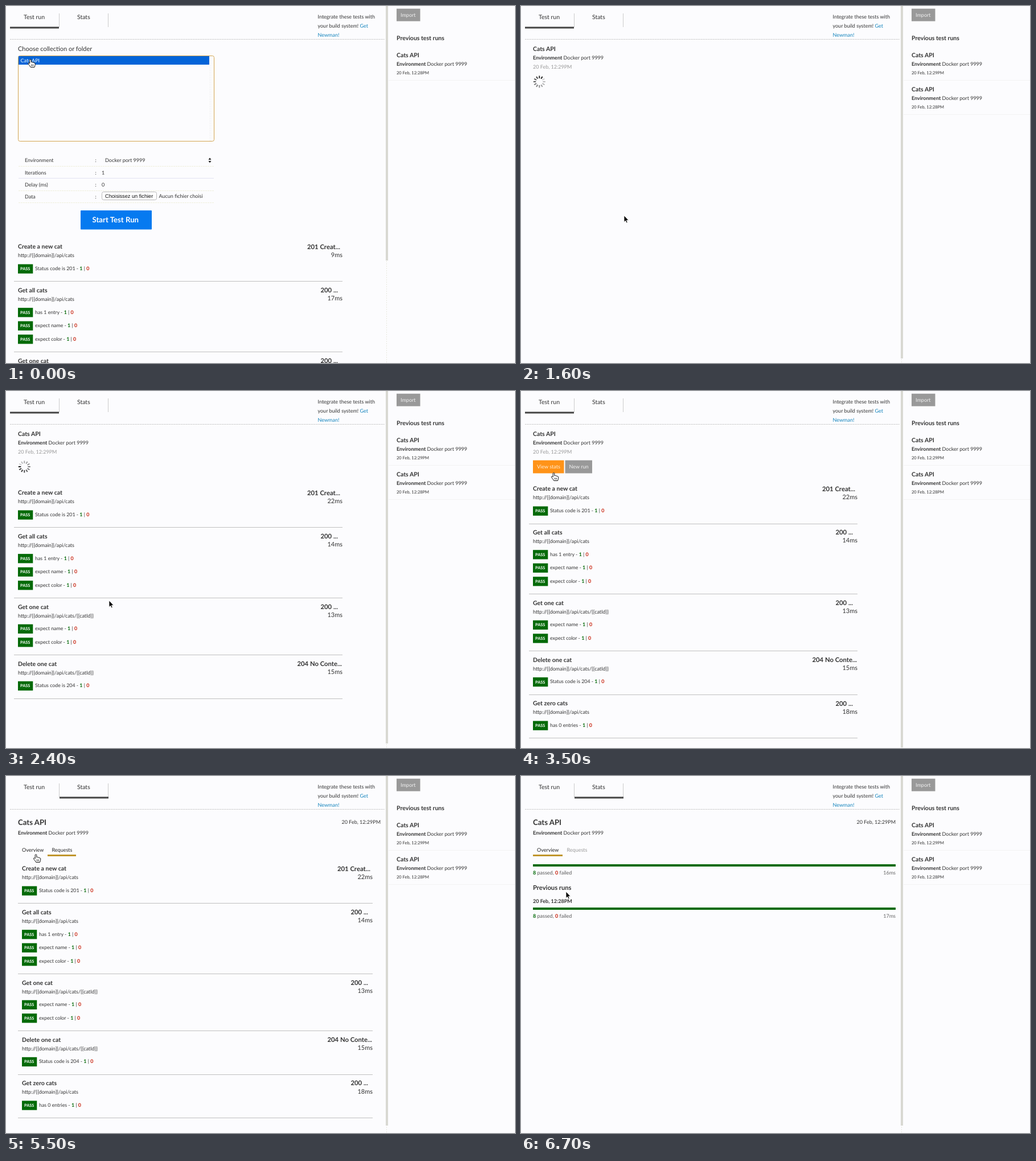
Recreate the animation shown at these times as an HTML page. Size 894 by 627 pixels, loop 6800 ms.

```html
<!DOCTYPE html>
<html lang="en">
<head>
<meta charset="utf-8">
<title>Test runner</title>
<style>
  html, body { margin: 0; width: 100%; height: 100%; overflow: hidden; background: #fcfcfe; }
  svg { display: block; font-family: Lato, sans-serif; text-rendering: geometricPrecision; }
</style>
</head>
<body>
<svg id="stage" width="894" height="627" viewBox="0 0 894 627"></svg>
<script>
const LOOP = 6800, STEP = 100;
const INK = '#333', GREEN = '#046a08', RED = '#c8210c', GREY = '#999', GOLD = '#c0962c';

// y is the middle of the capital letters
const text = (x, y, s, size = 9, { fill = INK, bold, end, font } = {}) =>
  `<text x="${x}" y="${Math.round(y + size * .36)}" font-size="${size}" fill="${fill}"` +
  `${bold ? ' font-weight="700"' : ''}${end ? ' text-anchor="end"' : ''}` +
  `${font ? ` font-family="${font}"` : ''}>${s}</text>`;
const rect = (x, y, w, h, fill, more = '') =>
  `<rect x="${x}" y="${y}" width="${w}" height="${h}" fill="${fill}" ${more}/>`;
const line = (x1, y1, x2, y2, stroke, dash = '') =>
  `<path d="M${x1} ${y1}L${x2} ${y2}" stroke="${stroke}" stroke-dasharray="${dash}"/>`;
const group = (id, body) => `<g id="${id}">${body}</g>`;
const strong = (s, fill) => `<tspan font-weight="700" fill="${fill}">${s}</tspan>`;
const ENV = strong('Environment', INK) + ' Docker port 9999';

const CATS = 'http://{{domain}}/api/cats', ONE = CATS + '/{{catId}}';
const requests = [
  { name: 'Create a new cat', url: CATS, status: '201 Creat...', x: 529, checks: ['Status code is 201'] },
  { name: 'Get all cats', url: CATS, status: '200 ...', x: 552.5, checks: ['has 1 entry', 'expect name', 'expect color'] },
  { name: 'Get one cat', url: ONE, status: '200 ...', x: 552.5, checks: ['expect name', 'expect color'] },
  { name: 'Delete one cat', url: ONE, status: '204 No Conte...', x: 511.5, checks: ['Status code is 204'] },
  { name: 'Get zero cats', url: CATS, status: '200 ...', x: 552.5, checks: ['has 0 entries'] },
];
const TIMES = [22, 14, 13, 15, 18];

function results(id, y, left, right, times) {
  return times.map((ms, i) => {
    const { name, url, status, x, checks } = requests[i];
    const rows = checks.map((check, k) => {
      const cy = y + 38 + 23.5 * k;
      return rect(left + 21, cy - 7.3, 26.3, 16.3, GREEN) +
        text(left + 25, cy + .7, 'PASS', 7.3, { fill: '#fff', bold: 1 }) +
        text(left + 51, cy, `${check} - ${strong(1, GREEN)} | ${strong(0, RED)}`, 8.8);
    }).join('');
    const height = 53.1 + 23.5 * checks.length, rule = Math.floor(y + height - 15.5) + .5;
    const body = text(left + 21, y - .2, name, 10.5, { bold: 1 }) + text(left + 21, y + 15.3, url) +
      text(right + x, y - .3, status, 11.3, { bold: 1 }) +
      text(right + 591, y + 14, ms + 'ms', 11, { end: 1 }) + rows +
      line(left + 14, rule, right + 591, rule, '#c0c0c0');
    y += height;
    return group(id + i, body);
  }).join('');
}

const pastRun = (y, time) => text(686, y, 'Cats API', 10.5, { bold: 1 }) +
  text(686, y + 16, ENV) + text(686, y + 31.5, `20 Feb, ${time}PM`, 7.5) +
  line(672, y + 44.5, 894, y + 44.5, '#f3f3f3');

const frame =
  text(31, 19.2, 'Test run', 10.5) + text(125, 19.2, 'Stats', 10.5) +
  line(93.5, 13, 93.5, 37, '#ccc') + line(179.5, 13, 179.5, 37, '#ccc') +
  `<rect id="tab" y="36.5" width="86" height="3" fill="#444"/>` +
  line(7, 58.5, 665, 58.5, '#c4c4c4', '2 1') +
  text(547.5, 19, 'Integrate these tests with') +
  text(547.5, 35, 'your build system! <tspan fill="#1484bd">Get</tspan>') +
  text(547.5, 50.5, 'Newman!', 9, { fill: '#1484bd' }) +
  line(668.5, 0, 668.5, 627, '#e9e9de', '2 2') +
  `<rect id="bar" x="667" y="0" width="4" fill="#d8d8d2"/>` +
  rect(686, 4.7, 41.5, 22, GREY) + text(693, 16, 'Import', 9, { fill: '#f2f2f2' }) +
  text(686, 56.5, 'Previous test runs', 10.5, { bold: 1 }) +
  group('sideOld', pastRun(86, '12:28')) +
  group('sideNew', pastRun(86, '12:29') + pastRun(146, '12:28'));

const field = (y, label, value, x = 168) =>
  text(33, y, label) + text(156.5, y, ':') + text(x, y, value);

const form =
  text(21, 75, 'Choose collection or folder', 11) +
  rect(21.5, 87.5, 344, 150, 'none', 'rx="3" stroke="#d3a550"') +
  rect(22, 88, 335, 15, '#0464d8') + text(25.5, 95.5, 'Cats API', 9, { fill: '#fff' }) +
  line(358.5, 89, 358.5, 237, '#e2e2e2', '1 2') + line(361.5, 89, 361.5, 237, '#eee', '1 2') +
  field(271, 'Environment', 'Docker port 9999', 174) +
  `<path d="M355.5 270l2.5-3.5 2.5 3.5zM355.5 272l2.5 3.5 2.5-3.5z" fill="#222"/>` +
  field(292.5, 'Iterations', '1') + field(313.5, 'Delay (ms)', '0') +
  field(335, 'Data', '') +
  [281.5, 302.5, 324.5, 345.5].map((y, i) =>
    line(22, y, 365, y, i == 1 ? '#e2e2f2' : '#efefdc', i == 1 ? '' : '3 1')).join('') +
  rect(168.5, 326.5, 96, 14, '#fff', 'rx="3" stroke="#b8b8b8"') +
  text(174, 333.5, 'Choisissez un fichier', 9.2, { fill: '#111', font: 'Liberation Sans, sans-serif' }) +
  text(268.5, 333.5, 'Aucun fichier choisi') +
  rect(131, 359, 125, 33.5, '#067af0', 'rx="1"') +
  text(151.5, 375.5, 'Start Test Run', 13.2, { fill: '#fff', bold: 1 }) +
  results('old', 422.8, 0, 0, [9, 17, 13]);

const spokes = Array.from({ length: 12 }, (_, i) =>
  `<path class="spoke" d="M0-6V-10.5" stroke="#222" stroke-width="2" transform="translate(32.3 133)rotate(${i * 30})"/>`).join('');

const run =
  text(21, 75.5, 'Cats API', 10.5, { bold: 1 }) + text(21, 91, ENV) +
  text(21, 106.5, '20 Feb, 12:29PM', 9, { fill: GREY }) +
  group('pending', spokes + results('new', 178.8, 0, 0, TIMES)) +
  group('finished',
    rect(21, 121.7, 54.5, 22.8, '#ff9318') + text(28, 133, 'View stats', 9, { fill: '#fff0dc' }) +
    rect(77.5, 121.7, 47.5, 22.8, GREY) + text(84.5, 133, 'New run', 9, { fill: '#f2f2f2' }) +
    results('done', 171.9, 0, 0, TIMES));

const summary = (y, ms) => rect(21, y, 637, 4, GREEN) +
  text(21, y + 15, `${strong(8, GREEN)} passed, ${strong(0, RED)} failed`, 9, { fill: '#555' }) +
  text(658, y + 15, ms + 'ms', 9, { fill: '#666', end: 1 });

const stats =
  text(21, 81, 'Cats API', 13.2, { bold: 1 }) + text(21, 99.5, ENV) +
  text(658, 81, '20 Feb, 12:29PM', 9, { end: 1 }) +
  group('overviewTab', text(28, 129.5, 'Overview', 9, { fill: 'inherit' })) +
  group('requestsTab', text(80.5, 129.5, 'Requests', 9, { fill: 'inherit' })) +
  group('requests', rect(73, 138, 50, 3, GOLD) + results('stat', 162.8, 7, 53, TIMES)) +
  group('overview', rect(21, 138, 52, 3, GOLD) + summary(155, 16) +
    text(21, 196, 'Previous runs', 11.2, { bold: 1 }) +
    text(21, 219.5, '20 Feb, 12:28PM', 9, { bold: 1 }) + summary(231, 17));

const cursor = group('cursor',
  `<path id="arrow" d="M0 0V11.5L2.6 9.1 4.3 13 6.2 12.2 4.5 8.4H8z" fill="#000" stroke="#fff" stroke-width=".8"/>` +
  group('hand', `<path d="M-1.3 7V.8Q-1.2-.3 0-.3T1.3.8V4.5q2-.6 2.6.6 2-.4 2.5.8 1.9 0 1.9 1.8 0 3-1.3 5.8H.2Q-1.5 10.5-4 7.6-4.6 6-3 6-2 6.2-1.3 7z" fill="#fff" stroke="#111"/>` +
    `<path d="M1.5 8.5v3M3.3 8.5v3M5.1 8.5v3" stroke="#111" stroke-width=".7"/>`));

const $ = id => document.getElementById(id);
$('stage').innerHTML = frame + group('form', form) + group('run', run) + group('stats', stats) + cursor;
const show = (id, on) => { $(id).style.display = on ? '' : 'none'; };

// time, x, y of the pointer
const path = [
  [0, 43, 94], [200, 43, 94], [900, 165, 345], [1300, 181, 368], [2500, 181, 368],
  [3300, 58, 144], [3500, 57.5, 144], [4000, 56.5, 138.5], [4800, 56.5, 138.5],
  [5100, 52.5, 138], [5800, 52.5, 138], [6500, 79, 203], [LOOP, 79, 203],
];
function pointer(t) {
  const i = path.findIndex((p, k) => t < path[k + 1][0]);
  const [t0, x0, y0] = path[i], [t1, x1, y1] = path[i + 1];
  const u = (t - t0) / (t1 - t0), e = u * u * (3 - 2 * u);
  return [x0 + (x1 - x0) * e, y0 + (y1 - y0) * e];
}

const START = 1600, DONE = 2600, STATS = 3700, HOVER = 4900, OVERVIEW = 5600;

function draw(t) {
  const started = t >= START, done = t >= DONE, inStats = t >= STATS, over = t >= OVERVIEW;
  show('form', !started);
  show('run', started && !inStats);
  show('stats', inStats);
  show('sideOld', !started);
  show('sideNew', started);
  show('pending', !done);
  show('finished', done);
  show('requests', !over);
  show('overview', over);
  $('tab').setAttribute('x', inStats ? 94 : 7);
  $('bar').setAttribute('height', !started ? 447 : !done ? 619 : !inStats ? 626 : 614);
  $('overviewTab').setAttribute('fill', t >= HOVER ? '#222' : GREY);
  $('requestsTab').setAttribute('fill', over ? GREY : '#222');
  requests.forEach((_, i) => show('new' + i, t >= 1800 + 200 * i));

  const head = t / STEP + 9;
  document.querySelectorAll('.spoke').forEach((s, i) =>
    s.setAttribute('opacity', 1 - ((head - i + 24) % 12) / 14));

  const [x, y] = pointer(t);
  const inside = (l, top, r, b) => x >= l && x <= r && y >= top && y <= b;
  const hand = !started ? inside(22, 88, 357, 103) || inside(131, 359, 256, 392)
    : !inStats ? done && inside(21, 121, 125, 145)
    : inside(21, 120, 123, 145);
  show('hand', hand);
  show('arrow', !hand);
  $('cursor').setAttribute('transform', `translate(${x} ${y})`);
}

const begin = performance.now();
function tick() {
  const t = (performance.now() - begin) % LOOP;
  draw(Math.floor(t / STEP) * STEP);
  requestAnimationFrame(tick);
}
tick();
</script>
</body>
</html>
```
